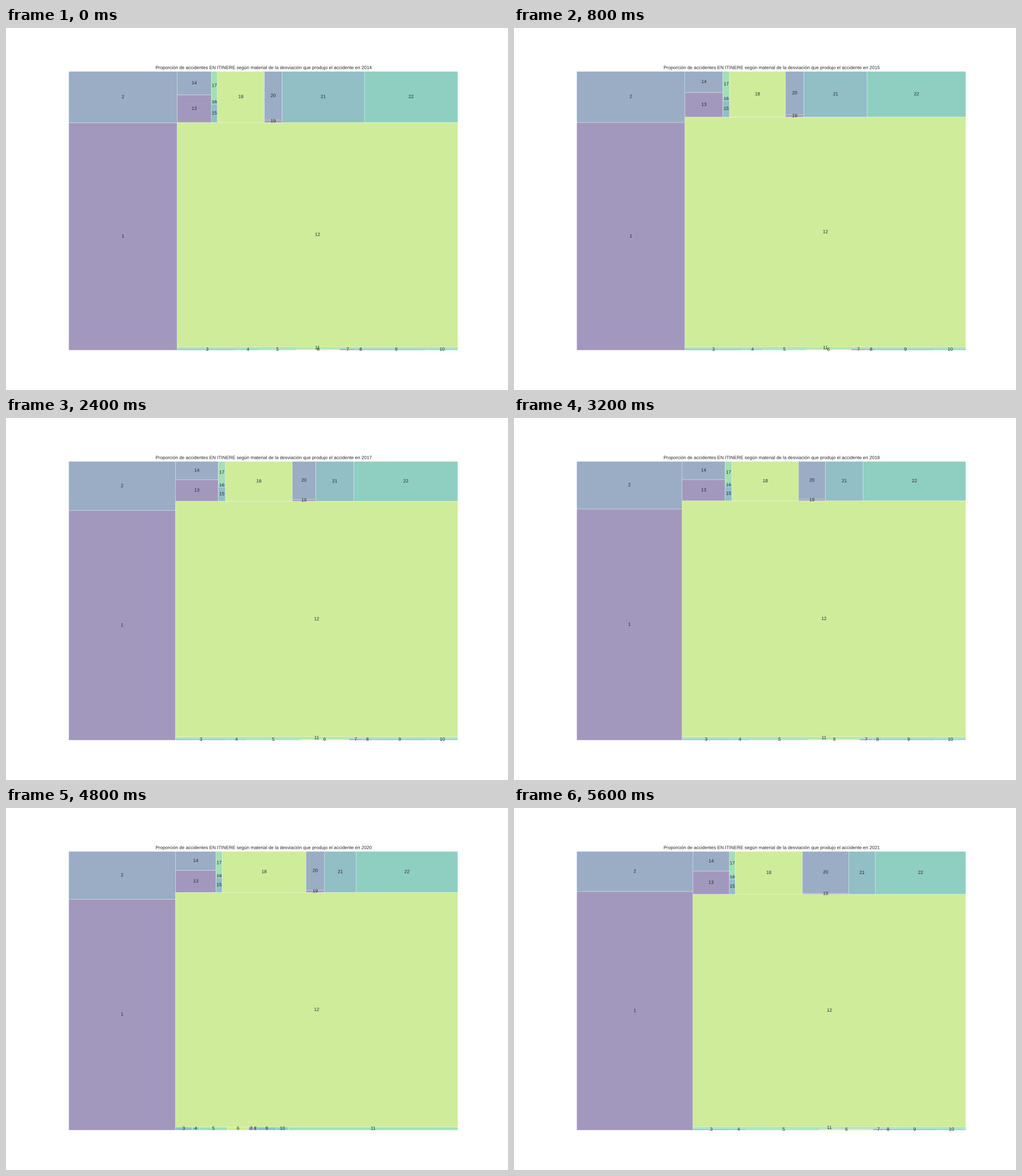
Write a matplotlib script that moves like this. It is 881 px wide and 636 px high and loops after 6.4 s.

```python
import numpy as np
import matplotlib.pyplot as plt
from matplotlib.animation import FuncAnimation
from matplotlib.patches import Rectangle
from matplotlib.patheffects import Normal

W, H, DPI = 881, 636, 64
SCALE = W / 18 / DPI  # sizes are those of an 18 inch wide figure
LEFT, RIGHT = 0.125 * W, 0.9 * W
TOP, BOTTOM = 0.12 * H, 0.89 * H
FIRST_YEAR, YEARS = 2014, 8
COLORS = ["#46327e", "#365c8d", "#277f8e", "#1fa187", "#4ac16d", "#a0da39"]

# Percentages of all accidents at turning points, linear in between.
TILE_1 = {2016: 22.72, 2018: 22.46, 2019: 21.25, 2020: 22.73, 2021: 25.56}
TILE_2 = {2014: 5.13, 2016: 5.04, 2018: 4.62, 2020: 4.7, 2021: 4.3}
TOP_GROUPS = [
    {2014: 1.61, 2020: 1.53, 2021: 1.44},                      # 13, 14
    {2014: 0.285, 2021: 0.23},                                 # 15, 16, 17
    {2014: 2.21, 2016: 2.49, 2018: 2.41, 2019: 2.57, 2020: 3.16, 2021: 2.65},  # 18
    {2014: 0.83, 2016: 0.73, 2018: 0.98, 2019: 0.68, 2020: 0.7, 2021: 1.83},   # 19, 20
    {2014: 3.88, 2016: 1.435, 2019: 1.336, 2021: 1.05},        # 21
    {2014: 4.39, 2016: 3.9, 2018: 3.72, 2020: 3.84, 2021: 3.57},               # 22
]
TILE_19 = 0.037
LOW_SHARE = 0.82      # tiles 3 to 11 together
LOW_ROW = 0.4         # part of it held by tiles 3 to 10
LOW_START = np.array([0.215, 0.075, 0.135, 0.155, 0.055, 0.038, 0.215, 0.112])
LOW_END = np.array([0.135, 0.065, 0.265, 0.195, 0.04, 0.03, 0.165, 0.105])
ONE_ROW_YEARS = (2019, 2020)  # tile 11 stands beside tiles 3 to 10


def share(points, year):
    return np.interp(year, list(points), list(points.values()))


def edges(start, end, parts):
    return start + (end - start) * np.append(0, np.cumsum(parts)) / np.sum(parts)


def row(x0, x1, y0, y1, parts):
    xs = edges(x0, x1, parts)
    return [(a, y0, b, y1) for a, b in zip(xs, xs[1:])]


def column(x0, x1, y0, y1, parts):
    """Stack tiles from the bottom y1 up to y0."""
    ys = edges(y1, y0, parts)
    return [(x0, b, x1, a) for a, b in zip(ys, ys[1:])]


def low_tiles(year, x, y):
    t = (year - FIRST_YEAR) / (YEARS - 1)
    parts = LOW_START + (LOW_END - LOW_START) * t
    if year in ONE_ROW_YEARS:
        return row(x, RIGHT, y, BOTTOM, [*(parts * LOW_ROW), 1 - LOW_ROW])
    mid = BOTTOM - LOW_ROW * (BOTTOM - y)
    return row(x, RIGHT, mid, BOTTOM, parts) + [(x, y, RIGHT, mid)]


def top_tiles(x, y, groups):
    boxes = []
    inner = [[0.54, 0.46], [0.36, 0.08, 0.56], [1],
             [TILE_19, groups[3] - TILE_19], [1], [1]]
    for (x0, y0, x1, y1), parts in zip(row(x, RIGHT, TOP, y, groups), inner):
        boxes += column(x0, x1, y0, y1, parts)
    return boxes


def tiles(year):
    """Boxes (x0, y0, x1, y1) of tiles 1 to 22."""
    left = [share(TILE_1, year), share(TILE_2, year)]
    groups = [share(points, year) for points in TOP_GROUPS]
    x = LEFT + (RIGHT - LEFT) * sum(left) / 100
    per_share = (BOTTOM - TOP) / (100 - sum(left))
    y_top = TOP + sum(groups) * per_share
    y_low = BOTTOM - LOW_SHARE * per_share
    return (column(LEFT, x, TOP, BOTTOM, left) + low_tiles(year, x, y_low)
            + [(x, y_top, RIGHT, y_low)] + top_tiles(x, y_top, groups))


plt.rcParams.update({"font.family": "Liberation Sans", "font.size": 12 * SCALE,
                     "text.color": ".15", "text.hinting": "none"})
fig = plt.figure(figsize=(W / DPI, H / DPI), dpi=DPI, facecolor="white")
ax = fig.add_axes([0.125, 0.11, 0.775, 0.77])
ax.set_xlim(LEFT, RIGHT)
ax.set_ylim(BOTTOM, TOP)
ax.axis("off")

# The path effect draws glyphs as outlines, free of the pixel grid.
outline = [Normal()]
title = ax.set_title("", fontsize=12 * SCALE, pad=6 * SCALE, path_effects=outline)

rects, labels = [], []
for i in range(22):
    rect = Rectangle((0, 0), 1, 1, facecolor=COLORS[i % 6], edgecolor="white",
                     linewidth=SCALE, alpha=0.5, snap=False)
    rects.append(ax.add_patch(rect))
    labels.append(ax.text(0, 0, str(i + 1), ha="center", va="center",
                          path_effects=outline))


def update(k):
    year = FIRST_YEAR + k
    title.set_text("Proporción de accidentes EN ITINERE según material de la "
                   f"desviación que produjo el accidente en {year}")
    for rect, label, (x0, y0, x1, y1) in zip(rects, labels, tiles(year)):
        rect.set_bounds(x0, y0, x1 - x0, y1 - y0)
        label.set_position(((x0 + x1) / 2, (y0 + y1) / 2))
    return [title, *rects, *labels]


anim = FuncAnimation(fig, update, frames=YEARS, interval=800, repeat=True,
                     repeat_delay=0, blit=False)
plt.show()
```
